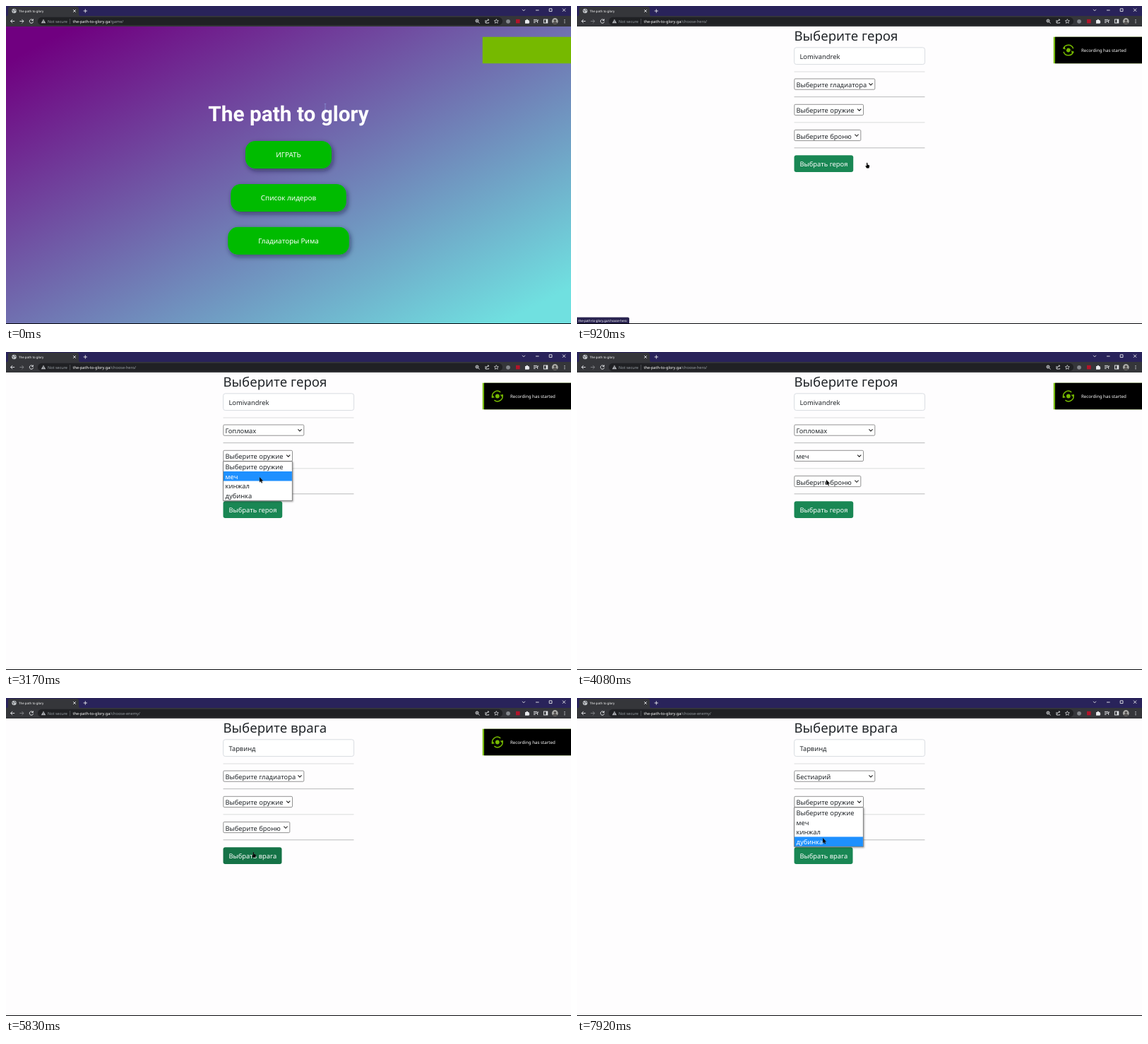
An HTML page that plays this animation: 800 by 450 pixels, repeating every 8000 ms.

```html
<!DOCTYPE html>
<html lang="ru">
<head>
<meta charset="utf-8">
<title>The path to glory</title>
<style>
  html, body { margin: 0; width: 100%; height: 100%; overflow: hidden; background: #000; }
  svg { display: block; width: 800px; height: 450px; font-family: "Noto Sans", "Open Sans", sans-serif; text-rendering: geometricPrecision; }
  .line { fill: none; stroke: #e8eaed; stroke-width: .9; }
  .dim { stroke: #85878b; }
  .form text { font-size: 9.3px; fill: #212529; }
  .form .white { fill: #fff; }
</style>
</head>
<body>
<svg viewBox="0 0 800 450" xmlns="http://www.w3.org/2000/svg">
  <defs>
    <linearGradient id="sky" x1="0" y1="0" x2="1" y2="1">
      <stop offset=".06" stop-color="#700080"/>
      <stop offset=".94" stop-color="#70e0e0"/>
    </linearGradient>
    <filter id="glow" x="-20%" y="-40%" width="140%" height="200%">
      <feDropShadow dx="2" dy="3" stdDeviation="3.5" flood-color="#101030" flood-opacity=".55"/>
    </filter>
    <filter id="drop" x="-10%" y="-10%" width="120%" height="125%">
      <feDropShadow dx="1" dy="1.2" stdDeviation=".9" flood-opacity=".35"/>
    </filter>
    <clipPath id="toastArea"><rect x="674.5" y="43.5" width="125.5" height="38"/></clipPath>
  </defs>

  <g id="menu">
    <rect y="29" width="800" height="420" fill="url(#sky)"/>
    <text x="400" y="163" text-anchor="middle" font-family="Roboto, sans-serif" font-weight="700" font-size="29.8" fill="#fff">The path to glory</text>
    <g id="menuButtons"></g>
  </g>
  <g id="form" class="form"></g>
  <g id="status">
    <path d="M0 440.5H72Q74 440.5 74 442.5V449H0Z" fill="#292350"/>
    <text x="2" y="446.7" font-size="4.4" fill="#fff">the-path-to-glory.ga/choose-hero</text>
  </g>

  <g id="browser">
    <rect width="800" height="15" fill="#29235a"/>
    <path d="M0 14.5Q3 14.5 3 11V4Q3 1 6 1H100Q103 1 103 4V11Q103 14.5 106 14.5Z" fill="#35363a"/>
    <rect y="14" width="800" height="15" fill="#35363a"/>
    <rect x="45" y="15.8" width="658" height="11.4" rx="5.7" fill="#202124"/>
    <g id="globe">
      <circle cx="11.5" cy="7" r="3.2" fill="#c4c7cb"/>
      <path d="M9 6L11 7.2L10.6 9.2M12 4.2L12.2 6L14.2 6.4" class="line" style="stroke:#4a4b50"/>
    </g>
    <path id="spinner" d="M11.5 4A3 3 0 0 1 14.5 7" class="line dim"/>
    <text x="18" y="8.7" font-size="4.4" fill="#fff">The path to glory</text>
    <path class="line" d="M95.2 5.2l3.6 3.6m0-3.6l-3.6 3.6M109.7 7h5.2m-2.6-2.6v5.2M731 4.8l2 2 2-2M750 6h4.6M769.2 3.8h3.8v3.8h-3.8zM788 3.6l4.2 4.2m0-4.2l-4.2 4.2"/>
    <path class="line" d="M12.2 21.5H6.6m2.6-2.6l-2.6 2.6 2.6 2.6"/>
    <path class="line" id="forward" d="M19.4 21.5h5.6m-2.6-2.6l2.6 2.6-2.6 2.6"/>
    <path class="line" id="reload" d="M38 19.8A2.7 2.7 0 1 0 38.6 22.2M38.4 18.4v2.2h-2.2"/>
    <path class="line" id="stop" d="M33.6 19.2l4.6 4.6m0-4.6l-4.6 4.6"/>
    <path d="M49.8 24.2L53 18.6L56.2 24.2Z" fill="#b6b9be"/>
    <path d="M53 20.4v1.9m0 .6v.7" stroke="#202124" stroke-width=".7"/>
    <text x="59" y="23.6" font-size="5.5" fill="#9aa0a6">Not secure</text>
    <path d="M90.6 18v7.5" stroke="#6a6d72" stroke-width=".6"/>
    <text x="94.5" y="23.6" font-size="5.6" fill="#fff">the-path-to-glory.ga<tspan id="path" fill="#9aa0a6"></tspan></text>
    <g class="line">
      <circle cx="667" cy="21" r="2"/>
      <path d="M668.5 22.5l2 2M666 21h2M679 20v4h4.6v-1M680 22.4q.4-2.8 3.6-2.8m-1.2-1.2l1.4 1.2-1.4 1.2"/>
      <path d="M694.3 18.6l.9 2 2.1.2-1.6 1.4.5 2.1-1.9-1.1-1.9 1.1.5-2.1-1.6-1.4 2.1-.2z" stroke-width=".7"/>
      <path d="M747 19.4h5M747 21.4h5M747 23.4h2.6M752.6 20v4M752.6 20h1.6"/>
      <rect x="761.4" y="19" width="5.4" height="5"/>
    </g>
    <circle cx="711" cy="21.8" r="2.9" fill="#85888d"/>
    <rect x="722" y="18.8" width="5.6" height="5.6" fill="#b3142a"/>
    <path d="M735 20h1.6a1.2 1.2 0 0 1 2.4 0h1.6v1.6a1.2 1.2 0 0 1 0 2.2v1h-5.6z" fill="#e8eaed"/>
    <path d="M764.6 19h2.2v5h-2.2z" fill="#e8eaed"/>
    <circle cx="777.3" cy="21.5" r="4.4" fill="#a9a9a6"/>
    <path d="M774 24.4Q774.3 22.6 777.3 22.6T780.6 24.4Q777.3 27.3 774 24.4Z" fill="#4d4a4a"/>
    <circle cx="777.3" cy="20.8" r="1.7" fill="#4d4a4a"/>
    <path d="M791 18.9v1.1m0 1v1.1m0 1v1.1" stroke="#e8eaed" stroke-width="1.1"/>
  </g>

  <g id="toast" clip-path="url(#toastArea)">
    <rect id="toastGreen" x="674.5" y="43.5" width="126" height="38" fill="#76b900"/>
    <g id="toastBlack">
      <rect x="677" y="43.5" width="124" height="38" fill="#000"/>
      <g id="recIcon" fill="none" stroke="#76b900" stroke-width="1.5">
        <circle cx="695.8" cy="62.5" r="2.9" fill="#76b900" stroke="none"/>
        <path d="M689 65A7.2 7.2 0 0 1 700.2 56.8M702.6 60A7.2 7.2 0 0 1 691.4 68.2"/>
        <path d="M699.5 60.6h4.6l-1.4 3.4zM692 64.4h-4.6l1.4-3.4z" fill="#76b900" stroke="none"/>
      </g>
      <text id="toastText" x="714" y="65.4" font-size="6.2" fill="#fff">Recording has started</text>
    </g>
  </g>

  <rect y="449" width="800" height="1" fill="#08080c"/>
  <g id="cursor">
    <path id="beam" d="M-1.3-4h2.6M0-4v8M-1.3 4h2.6" stroke="#8a96d8" stroke-width=".7"/>
    <path id="arrow" d="M0 0V7.4L1.7 5.9 2.9 8.6 4.1 8 2.9 5.5H5.2Z" fill="#000" stroke="#777" stroke-width=".25"/>
    <path id="hand" d="M-.5 0Q.3-.7 .9 .2V2.6L3.2 3.2Q3.9 3.6 3.6 5L2.9 7.6H-.4L-2.2 4.6Q-1.9 3.6-.5 4.6Z" fill="#000" stroke="#999" stroke-width=".2"/>
  </g>
</svg>
<script>
const LOOP = 8000, ROW = 13.75;
const MENU_END = 830, HERO_END = 5670;
const $ = id => document.getElementById(id);
const show = (id, on) => $(id).setAttribute('display', on ? 'inline' : 'none');
const within = (t, from, to) => t >= from && t < to;
const clamp01 = v => Math.max(0, Math.min(1, v));
const ease = v => v * v * (3 - 2 * v);
const ramp = (t, from, to) => ease(clamp01((t - from) / (to - from)));

const selects = [
  { y: 103, w: 114, options: ['Выберите гладиатора', 'Гопломах', 'Бестиарий', 'Фракиец'] },
  { y: 139.3, w: 97.7, options: ['Выберите оружие', 'меч', 'кинжал', 'дубинка'] },
  { y: 175.4, w: 94, options: ['Выберите броню', 'мантия', 'кожаная броня', 'кольчуга'] }
];
// from, to, select index
const openings = [[1750, 2670, 0], [2920, 3920, 1], [4250, 5080, 2], [6170, 6920, 0], [7250, LOOP, 1]];
// from, to, select index, chosen option
const choices = [[2670, HERO_END, 0, 1], [3920, HERO_END, 1, 1], [5080, HERO_END, 2, 1], [6920, LOOP, 0, 2]];
// time, x, y
const track = [
  [0, 452, 142.5], [80, 452, 142.5], [580, 410.5, 222], [920, 410.5, 222], [1600, 369, 113],
  [1750, 369, 113], [2080, 368, 122], [2250, 367, 124], [2340, 367, 124], [2580, 360, 137],
  [2750, 360, 137], [2920, 360, 147], [3170, 359, 177], [3340, 359, 177], [3580, 355, 203],
  [3670, 355, 203], [3840, 356, 176], [3940, 355, 176], [4170, 352, 183], [4250, 352, 184],
  [4480, 351, 212], [4510, 351, 212], [4580, 351, 220], [4670, 351, 220], [4830, 350, 212],
  [5080, 350, 212], [5330, 350, 222], [5800, 350, 222], [6080, 356, 112], [6170, 356, 112],
  [6500, 351, 153], [6920, 351, 153], [7170, 352, 147], [7250, 352, 148], [7580, 350, 190],
  [7750, 350, 190], [7900, 348, 198], [LOOP, 348, 198]
];

function cursorAt(t) {
  const i = Math.max(1, track.findIndex(k => k[0] > t));
  const [t0, x0, y0] = track[i - 1], [t1, x1, y1] = track[i];
  const p = ramp(t, t0, t1);
  return [x0 + (x1 - x0) * p, y0 + (y1 - y0) * p];
}

const label = (x, y, text, cls = '') => `<text x="${x}" y="${y}" class="${cls}">${text}</text>`;

function selectBox({ y, w, options }, chosen) {
  return `<rect x="307.8" y="${y}" width="${w}" height="15.2" rx="1.4" fill="#fff" stroke="#767676" stroke-width=".8"/>`
    + label(310.5, y + 12.1, options[chosen])
    + `<path d="M${302.8 + w - 3.4} ${y + 6.3}l2.6 2.6 2.6-2.6" fill="none" stroke="#222" stroke-width="1.1"/>`;
}

function optionList({ y, w, options }, pointerY) {
  const top = y + 15.5;
  const active = Math.max(0, Math.min(3, Math.floor((pointerY - top) / ROW)));
  return `<rect x="307.6" y="${top}" width="${w}" height="${ROW * 4 + .5}" fill="#fff" stroke="#666" stroke-width=".8" filter="url(#drop)"/>`
    + `<rect x="308" y="${top + active * ROW + .4}" width="${w - .8}" height="${ROW - .2}" fill="#1e90ff"/>`
    + options.map((o, i) => label(310.5, top + i * ROW + 11, o, i === active ? 'white' : '')).join('');
}

function formMarkup(t, pointerY) {
  const hero = t < HERO_END;
  const noun = hero ? 'героя' : 'врага';
  const open = openings.find(o => within(t, o[0], o[1]));
  const rules = [93, 128.6, 164.8, 200.8].map((y, i) =>
    `<path d="M307.5 ${y}h185" stroke="${i % 2 ? '#b9babb' : '#d2d3d4'}" stroke-width="${i % 2 ? 1 : .8}"/>`).join('');
  const boxes = selects.map((s, i) => {
    const choice = choices.find(c => c[2] === i && within(t, c[0], c[1]));
    return selectBox(s, choice ? choice[3] : 0);
  }).join('');
  return '<rect y="29" width="800" height="420" fill="#fefdfe"/>'
    + `<text x="307.5" y="49" style="font-size:18.6px">Выберите ${noun}</text>`
    + '<rect x="307.6" y="58.8" width="185" height="23.8" rx="3" fill="#fff" stroke="#ced4da" stroke-width=".8"/>'
    + label(315.5, 74.6, hero ? 'Lomivandrek' : 'Тарвинд')
    + rules + boxes
    + `<rect x="307.5" y="211.3" width="${hero ? 83.7 : 83}" height="23.7" rx="3" fill="${within(t, 5300, 5900) ? '#157347' : '#198754'}"/>`
    + label(315.5, 227, `Выбрать ${noun}`, 'white')
    + (open ? optionList(selects[open[2]], pointerY) : '');
}

function menuButtons(hover) {
  const mix = (a, b) => Math.round(a + (b - a) * hover);
  const items = [['ИГРАТЬ', 122, 191], ['Список лидеров', 163.5, 252], ['Гладиаторы Рима', 171.5, 312.8]];
  return items.map(([text, w, y], i) => {
    const fill = i ? '#00bb04' : `rgb(${mix(0, 4)},${mix(187, 162)},${mix(4, 32)})`;
    return `<rect x="${400 - w / 2}" y="${y}" width="${w}" height="39" rx="14" fill="${fill}" filter="url(#glow)"/>`
      + `<text x="400" y="${y + 22.8}" text-anchor="middle" font-size="9.9" fill="#fff">${text}</text>`;
  }).join('');
}

function drawToast(t) {
  const blackX = 124 * (1 - ramp(t, 80, 420) + ramp(t, 5830, 6170));
  const greenX = 126 * ramp(t, 6170, 6500);
  show('toast', t < 6500);
  $('toastBlack').setAttribute('transform', `translate(${blackX} 0)`);
  $('toastGreen').setAttribute('transform', `translate(${greenX} 0)`);
  $('toastText').setAttribute('opacity', ramp(t, 330, 580));
  $('recIcon').setAttribute('transform', `rotate(${360 * ramp(t, 750, 1650)} 695.8 62.5)`);
}

function drawCursor(t, x, y) {
  const beam = t < 250;
  const hand = within(t, 500, 950) || within(t, 5300, 5900);
  $('cursor').setAttribute('transform', `translate(${x} ${y})`);
  show('beam', beam);
  show('hand', hand);
  show('arrow', !beam && !hand);
}

function drawBrowser(t) {
  const loading = within(t, 670, 900) || within(t, 5420, HERO_END);
  show('spinner', loading);
  show('globe', !loading);
  show('stop', loading);
  show('reload', !loading);
  $('spinner').setAttribute('transform', `rotate(${-t * .4} 11.5 7)`);
  $('forward').setAttribute('class', t < MENU_END ? 'line' : 'line dim');
  $('path').textContent = t < MENU_END ? '/game/' : t < HERO_END ? '/choose-hero/' : '/choose-enemy/';
  show('status', within(t, 580, 1000));
}

function render(t) {
  const [x, y] = cursorAt(t);
  const onMenu = t < MENU_END;
  show('menu', onMenu);
  show('form', !onMenu);
  if (onMenu) $('menuButtons').innerHTML = menuButtons(ramp(t, 450, 650));
  else $('form').innerHTML = formMarkup(t, y);
  drawBrowser(t);
  drawToast(t);
  drawCursor(t, x, y);
}

const start = performance.now();
function tick() {
  render((performance.now() - start) % LOOP);
  requestAnimationFrame(tick);
}
tick();
</script>
</body>
</html>
```
